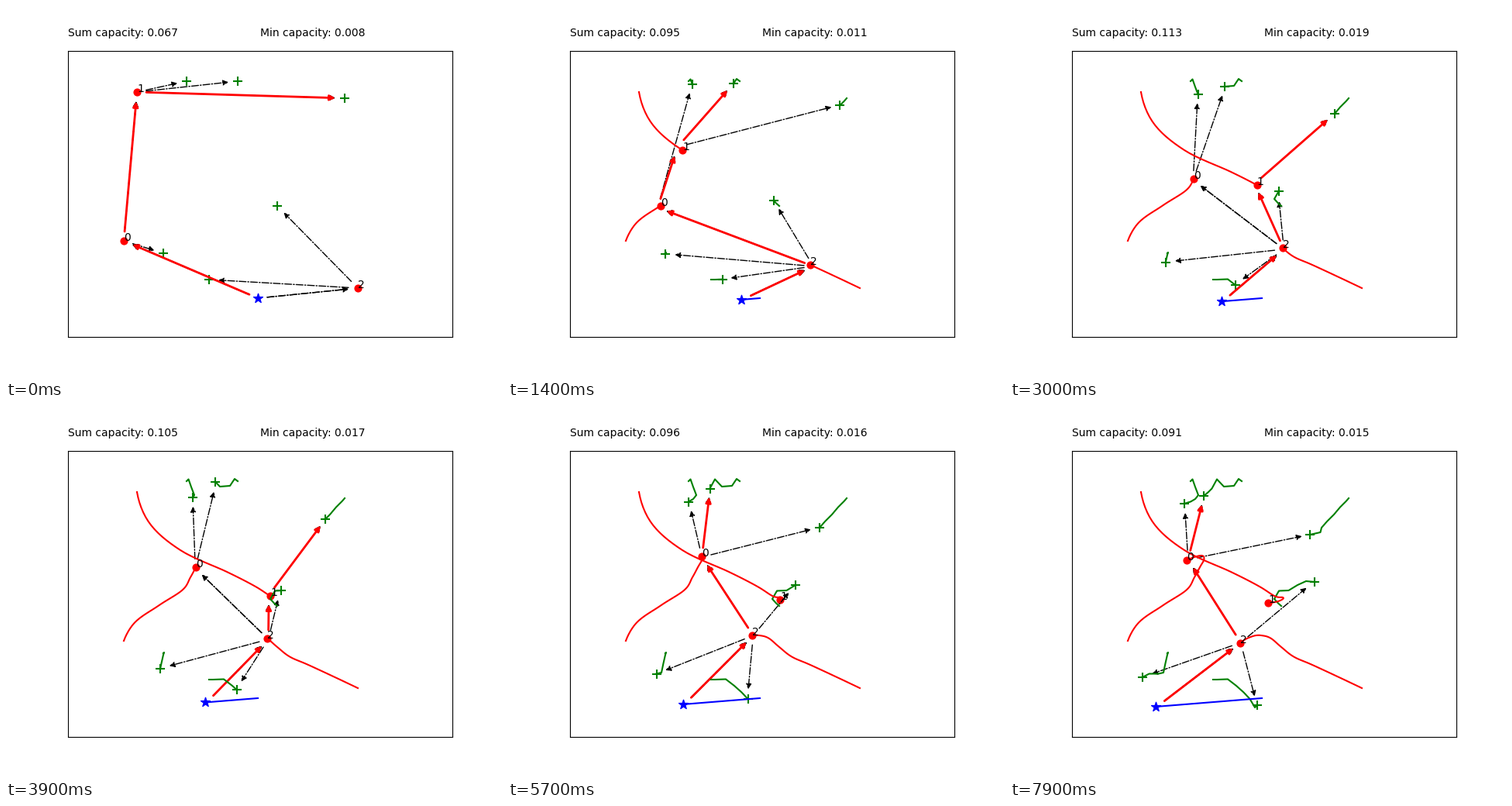
These frames come from a looping animation (640 by 480 pixels, 8000 ms). A matplotlib script:

```python
import numpy as np
import matplotlib.pyplot as plt
from matplotlib.animation import FuncAnimation
from matplotlib.patches import FancyArrowPatch

FRAMES, INTERVAL = 80, 100
LAST = FRAMES - 1
STEPS = np.arange(FRAMES)

TURNS = (0, *range(5, LAST - 5, 13), LAST)      # users turn every 13 steps
STOPS = (0, 5, 14, 22, 31, 39, 49, 65, LAST)    # relays glide through these


def walk(*points, times=TURNS):
    """Straight legs between points, one position per step."""
    return np.column_stack([np.interp(STEPS, times, v) for v in zip(*points)])


def glide(*points):
    """Smooth cubic Hermite path through points."""
    t, p = np.array(STOPS, float), np.array(points, float)
    slope = np.gradient(p, t, axis=0, edge_order=2)
    i = np.clip(np.searchsorted(t, STEPS, side="right") - 1, 0, len(t) - 2)
    h = (t[i + 1] - t[i])[:, None]
    u = (STEPS - t[i])[:, None] / h
    ease = u * u * (3 - 2 * u)
    return (p[i] + (p[i + 1] - p[i]) * ease
            + h * u * (1 - u) * (slope[i] * (1 - u) - slope[i + 1] * u))


def counter(*keys):
    return np.interp(STEPS, *zip(*keys))


nodes = {
    "S": walk((325, 377), (188, 388), times=(0, LAST)),
    "0": glide((152, 303), (163, 283), (197, 257.5), (227, 238), (238, 221),
               (245, 208), (250, 199), (246, 193), (228, 199)),
    "1": glide((169, 111), (180, 143), (225, 186), (285, 214), (322, 233),
               (341, 245), (352, 247), (346, 252), (333, 254)),
    "2": glide((454, 364), (433, 354), (390, 334), (367, 324), (350, 311),
               (337, 300), (324, 296), (308, 299), (297, 306)),
    "A": walk((233, 97), (235.5, 94.5), (239, 104.5), (243, 115),
              (239, 120), (233, 123.5), (228, 125), (225, 126)),
    "B": walk((299, 97), (295, 94), (289, 103), (276, 104),
              (267, 94.5), (260.5, 106.5), (256, 111), (250, 116)),
    "C": walk((437, 119), (434, 122.5), (426, 130.5), (418, 140),
              (409, 149), (402, 157), (400.5, 163), (387, 166)),
    "D": walk((350, 258), (346, 254.5), (341, 249), (347, 238.5),
              (359.5, 238), (371, 231), (382, 226), (393, 227)),
    "E": walk((203, 319), (204, 318), (203, 321), (200.5, 332),
              (198, 344), (191.5, 345.5), (179.5, 345.5), (171, 350)),
    "F": walk((262, 353), (267, 353), (281, 352.5), (292, 361),
              (301.5, 369.5), (309.5, 378), (316, 389), (319, 386)),
}

# (first step, route from the base to each user, user with the weakest route)
ROUTES = [
    (0, "S01A S01B S01C S2D S0E S2F", "C"),
    (8, "S20A S201B S201C S2D S2E S2F", "B"),
    (18, "S21A S21B S21C S2D S2E S2F", "C"),
    (30, "S20A S20B S21C S2D S2E S2F", "C"),
    (45, "S20A S20B S20C S2D S2E S2F", "B"),
]

total = counter((0, .067), (14, .095), (22, .121), (39, .105),
                (49, .098), (65, .093), (LAST, .091))
lowest = counter((0, .008), (14, .011), (22, .018), (28, .019),
                 (40, .017), (LAST, .0146))

fig = plt.figure(figsize=(6.4, 4.8), dpi=100, facecolor="white")
ax = fig.add_axes([0.125, 0.11, 0.775, 0.77])


def draw_route(route, k, **style):
    # links trail the nodes by one step
    spots = [nodes[n][max(k - 1, 0)] for n in route]
    for a, b in zip(spots, spots[1:]):
        ax.add_patch(FancyArrowPatch(
            a, b, arrowstyle="-|>", mutation_scale=10,
            shrinkA=8.66, shrinkB=8.66, zorder=1, **style))


def draw_nodes(names, k, color, marker, size):
    ax.scatter(*np.transpose([nodes[n][k] for n in names]),
               s=size, c=color, marker=marker, zorder=1)
    for n in names:
        ax.plot(*nodes[n][:k + 1].T, color=color, lw=1.5, zorder=2)


def draw(k):
    ax.clear()
    ax.set(xlim=(80, 576), ylim=(427.2, 57.6), xticks=[], yticks=[])
    draw_nodes("ABCDEF", k, "green", "+", 80)
    draw_nodes("012", k, "red", "o", 40)
    draw_nodes("S", k, "blue", "*", 80)

    _, routes, weakest = [row for row in ROUTES if row[0] <= k][-1]
    routes = routes.split()
    for route in routes:
        draw_route(route, k, color="black", lw=1, linestyle="dashdot")
    for route in routes:
        if route.endswith(weakest):
            draw_route(route, k, color="red", lw=2)

    for n in "012":
        ax.text(*nodes[n][k], n)
    ax.text(0, 1.05, f"Sum capacity: {total[k]:.3f}", transform=ax.transAxes)
    ax.text(0.5, 1.05, f"Min capacity: {lowest[k]:.3f}", transform=ax.transAxes)


anim = FuncAnimation(fig, draw, frames=FRAMES, interval=INTERVAL,
                     init_func=lambda: None, repeat=True, repeat_delay=0)
plt.show()
```
